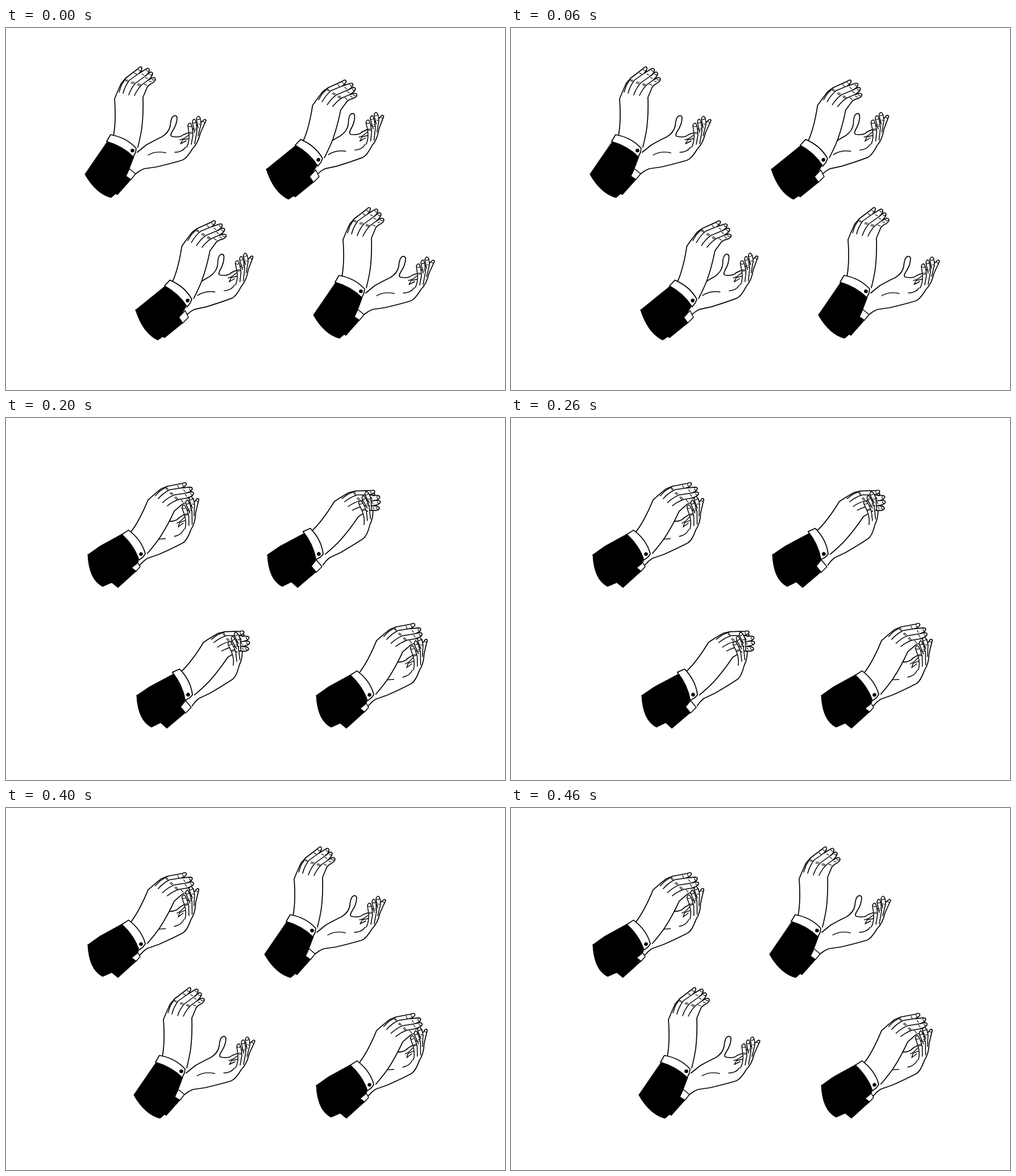
Animation, 878 px wide and 638 px high, one loop 500 ms. Source, as an HTML page with a canvas:

```html
<!DOCTYPE html>
<html>
<head>
<meta charset="utf-8">
<title>Clapping hands</title>
<style>
html, body { margin: 0; height: 100%; overflow: hidden; background: #fff; }
canvas { display: block; }
</style>
</head>
<body>
<canvas id="stage" width="878" height="638"></canvas>
<script>
const ctx = document.getElementById('stage').getContext('2d');
const path = d => new Path2D(d);

// Both hands are drawn wide open, then turned about the wrist.
const upper = {
  pivot: [189, 187],
  skin: path('M189 190Q194 165 191 125Q196 112 203 97L211 88L232 72Q237 66 239 70Q240 74 234 80L247 72Q251 70 252 73Q253 78 246 84L252 79Q257 76 258 80Q258 85 250 92L257 88Q263 86 263 91Q261 96 254 99Q248 103 247 108L241 122Q242 150 239 176Q237 190 232 210'),
  lines: path('M234 80L217 92Q209 103 206 115M246 84L228 97Q220 106 216 118M250 92L239 100Q231 108 226 119M211 88L203 101L199 113'),
  ticks: path('M209 91l5 1M210 93l5 1M221 95l5 1M220 97l5 1M232 98l5 2M231 100l5 2M243 99l5 2M226 79l4 3M239 81l4 2M245 87l4 2M252 94l4 1M233 73q1 3 4 2M247 74q1 3 4 2M253 81q1 3 4 1M257 90q1 3 4 1'),
  cuff: path('M184 188Q212 193 229 212L228 219L224 227Q205 208 177 200Z')
};
const lower = {
  pivot: [240, 250],
  skin: path('M231 219L247 206Q265 196 274 192Q287 184 289 172Q290 158 295 155Q300 153 301 158Q301 170 292 183Q288 190 292 191Q306 194 312 188L323 184L336 172L346 164Q350 159 352 163L342 185Q338 203 328 213Q318 230 310 233Q290 239 264 245L243 248Q235 251 228 257'),
  palm: path('M250 224Q264 216 281 220M297 219Q310 219 316 210M306 197Q313 196 321 189M307 204L311 197L321 195M307 204L317 199'),
  fingers: [
    path('M338 176L335 160Q337 154 340 156Q343 159 343 170L338 190'),
    path('M332 184L328 166Q329 160 332 161Q335 163 336 182L332 204'),
    path('M318 210Q323 200 322 186L320 172Q321 167 325 168Q328 172 329 188L326 205')
  ],
  ticks: path('M323 184l5 0M323 186l5 0M333 177l3 0M332 180l3 0M339 169l3 1M321 173q3 2 5 0M329 167q3 1 5-1M336 161q3 1 5-1M347 165l3 2')
};

// Wrist position and angle (degrees) of each hand, with the matching sleeve.
const poses = [
  { up: [189, 187, 0], low: [240, 250, 0],
    sleeve: 'M178 201Q206 208 225 227L217 248L211 262L220 267L196 294L193 292L185 299Q158 292 139 258Z',
    cuff: 'M217 248L228 257L220 267L211 261Z' },
  { up: [207.5, 196.5, 13], low: [243, 250, -4],
    sleeve: 'M142 249L195 206Q217 217 231 243L219 262L225 272L193 298L190 296L181 302Q155 290 142 249Z',
    cuff: 'M229 250L235 262L225 272L218 262Z' },
  { up: [220.5, 199, 26.5], low: [246, 250, -11],
    sleeve: 'M144 241L165 226L205 204Q228 222 233 253L221 264L229 270L197 299L186 290L170 297Q146 285 144 241Z',
    cuff: 'M232 255L236 262L229 270L221 264Z' },
  { up: [224, 196.5, 35.5], low: [251, 249, -17], closed: true,
    sleeve: 'M144 241L166 226L209 203Q227 222 229 249L221 260L230 271L197 299L186 289L170 297Q146 285 144 241Z',
    cuff: 'M230 250L240 262L230 272L221 261Z' }
].map(p => ({ ...p, sleeve: path(p.sleeve), cuff: path(p.cuff) }));

const cycle = [0, 1, 2, 3, 2];
const claps = [[0, 0, 0], [316, 0, 1], [86, 248, 1], [402, 248, 0]];

function shape(p, width = 1.7, fill = '#fff') {
  ctx.fillStyle = fill;
  ctx.lineWidth = width;
  ctx.fill(p);
  ctx.stroke(p);
}

function line(p, width) {
  ctx.lineWidth = width;
  ctx.stroke(p);
}

function turned(hand, [x, y, angle], draw) {
  ctx.save();
  ctx.translate(x, y);
  ctx.rotate(angle * Math.PI / 180);
  ctx.translate(-hand.pivot[0], -hand.pivot[1]);
  draw();
  ctx.restore();
}

function drawClap(pose) {
  turned(lower, pose.low, () => {
    shape(lower.skin);
    if (!pose.closed) line(lower.palm, 1.4);
  });
  shape(pose.sleeve, 1, '#000');
  shape(pose.cuff, 1.5);
  turned(upper, pose.up, () => {
    shape(upper.skin);
    line(upper.lines, 1.5);
    line(upper.ticks, 1.1);
    shape(upper.cuff);
    ctx.beginPath();
    ctx.arc(222.5, 216, 3.3, 0, 7);
    ctx.fillStyle = '#000';
    ctx.fill();
  });
  turned(lower, pose.low, () => {
    lower.fingers.forEach(f => shape(f, 1.5));
    line(lower.ticks, 1.1);
  });
}

function frame() {
  const step = Math.floor(performance.now() / 100);
  ctx.fillStyle = '#fff';
  ctx.fillRect(0, 0, 878, 638);
  ctx.lineJoin = ctx.lineCap = 'round';
  for (const [x, y, lead] of claps) {
    ctx.save();
    ctx.translate(x, y);
    drawClap(poses[cycle[(step + lead) % cycle.length]]);
    ctx.restore();
  }
  requestAnimationFrame(frame);
}
frame();
</script>
</body>
</html>
```
